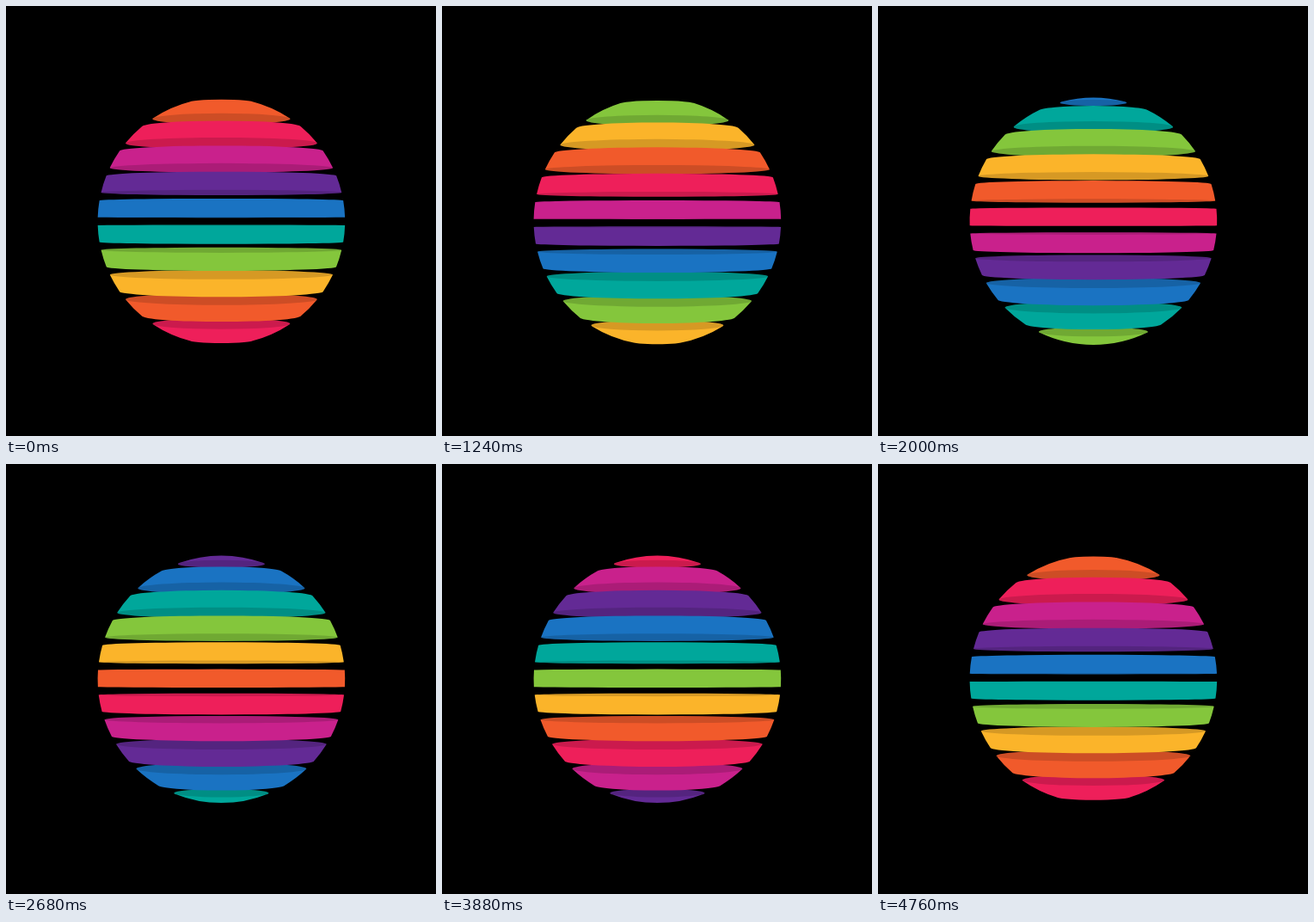
An HTML page with a canvas that plays this animation: 500 by 500 pixels, repeating every 4.8 s.

```html
<!DOCTYPE html>
<html lang="en">
<head>
<meta charset="utf-8">
<title>Sliced sphere</title>
<style>
html, body { margin: 0; height: 100%; overflow: hidden; background: #000; }
canvas { display: block; }
</style>
</head>
<body>
<canvas id="stage" width="500" height="500"></canvas>
<script>
const ctx = document.getElementById('stage').getContext('2d');
const COLORS = ['#00a79b', '#84c63c', '#fbb42a', '#f15a2b', '#ee1f5a', '#c9218c', '#632a95', '#1a73c2'];
const LOOP = 4800, CX = 250.4, CY = 250.3, R = 143.15;
const PITCH = 28.55, GAP = 9.2, CAMERA = 1500;

// Silhouette of the sphere as the camera sees it.
const RIM_DEPTH = R * R / CAMERA;
const RIM_SCALE = CAMERA / (CAMERA - RIM_DEPTH);
const RIM = R / Math.sqrt(1 - (R / CAMERA) ** 2);

const clamp = (v, limit) => Math.max(-limit, Math.min(limit, v));

// Perspective ellipse of the cut at height h, and the angle where it meets the silhouette.
function cutAt(h) {
  h = clamp(h, R);
  const radius = Math.sqrt(R * R - h * h);
  const e = radius / CAMERA, squash = 1 - e * e;
  return {
    y: h / squash,
    rx: radius / Math.sqrt(squash),
    ry: Math.abs(h) * e / squash,
    angle: Math.asin(clamp(h * RIM_SCALE / RIM, 1))
  };
}

function addCut({ y, rx, ry }) {
  ctx.moveTo(CX + rx, CY + y);
  ctx.ellipse(CX, CY + y, rx, ry, 0, 0, 2 * Math.PI);
}

function drawSlab({ top, bottom, color }) {
  ctx.beginPath();
  ctx.arc(CX, CY, RIM, top.angle, bottom.angle);
  ctx.arc(CX, CY, RIM, Math.PI - bottom.angle, Math.PI - top.angle);
  ctx.closePath();
  addCut(top);
  addCut(bottom);
  ctx.fillStyle = color;
  ctx.fill();

  // The face turned towards the equator is shaded.
  const face = bottom.y < 0 ? bottom : top.y > 0 ? top : null;
  if (!face) return;
  ctx.beginPath();
  addCut(face);
  ctx.fillStyle = 'rgba(0, 0, 0, 0.15)';
  ctx.fill();
}

function draw() {
  const shift = performance.now() % LOOP / LOOP * COLORS.length * PITCH;
  const slabs = [];
  for (let k = -14; k < 6; k++) {
    const y = k * PITCH + shift;
    const start = y + GAP / 2, end = y + PITCH - GAP / 2;
    if (end <= -R || start >= R) continue;
    slabs.push({
      top: cutAt(start),
      bottom: cutAt(end),
      distance: Math.abs(start + end),
      color: COLORS[(k + 16) % COLORS.length]
    });
  }
  ctx.fillStyle = '#000';
  ctx.fillRect(0, 0, 500, 500);
  slabs.sort((a, b) => b.distance - a.distance).forEach(drawSlab);
  requestAnimationFrame(draw);
}
draw();
</script>
</body>
</html>
```
